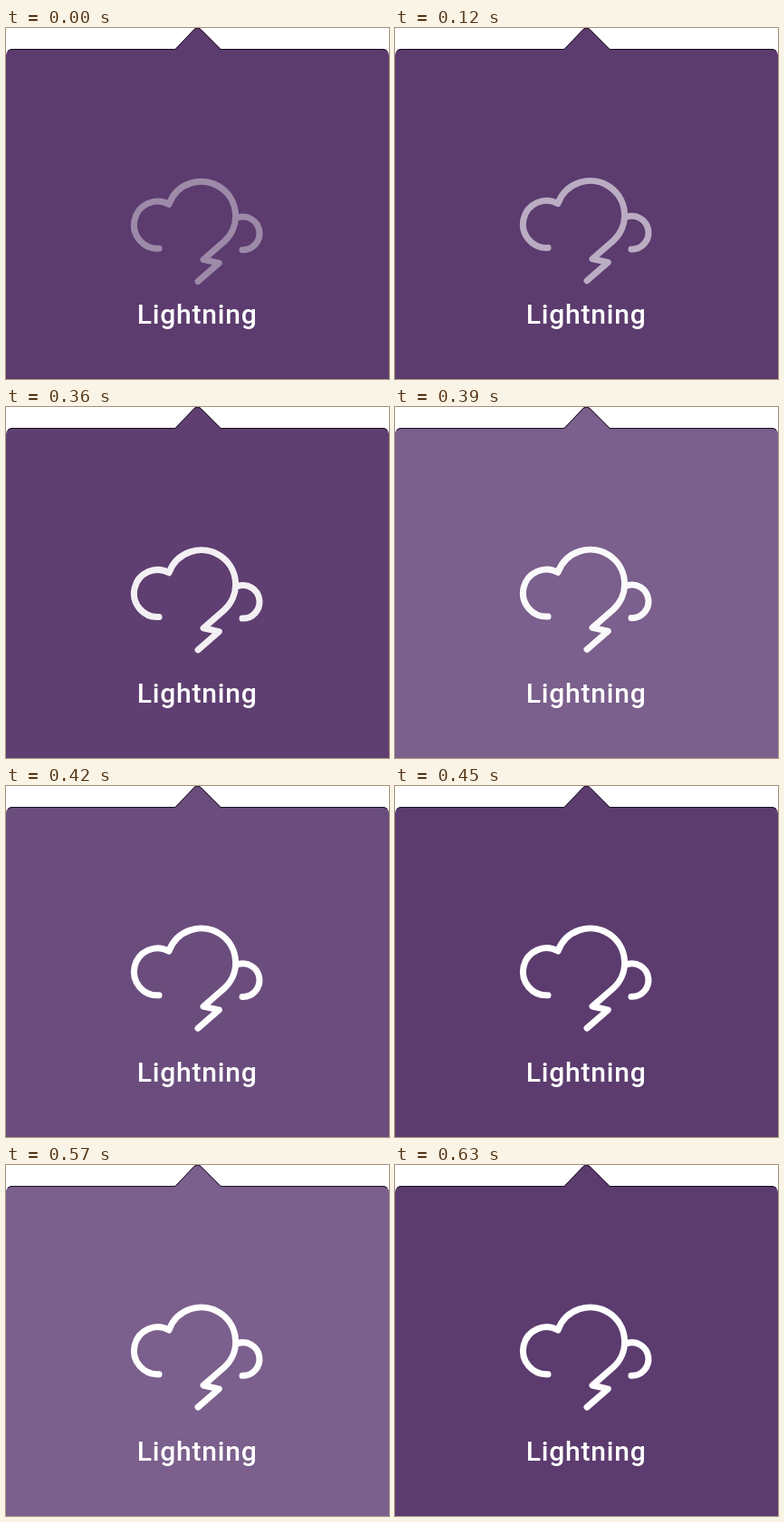
Write an HTML page that moves like this. It is 423 px wide and 387 px high and loops after 1.26 s.

```html
<!DOCTYPE html>
<html lang="en">
<head>
<meta charset="utf-8">
<title>Lightning</title>
<style>
  html, body { margin: 0; width: 100%; height: 100%; overflow: hidden; background: #fff; }
  svg { display: block; width: 100vw; height: 100vh; }
  .edge { fill: none; stroke: #1a1021; stroke-width: 1; }
  .icon { fill: none; stroke: #fff; stroke-width: 7; stroke-linecap: round; stroke-linejoin: round; }
  text { font: 500 30px Roboto, "Open Sans", sans-serif; letter-spacing: .8px; fill: #fff; }
</style>
</head>
<body>
<svg viewBox="0 0 423 387">
  <defs>
    <path id="panel" d="M0 387V30A7 7 0 0 1 7 23H187L208 1Q211.5 -2 215 1L237 23H416A7 7 0 0 1 423 30V387Z"/>
  </defs>
  <use href="#panel" fill="#5c3c6f"/>
  <use id="flash" href="#panel" fill="#7b5f8c" opacity="0"/>
  <path class="edge" d="M2 25.5Q4 23.5 7 23.5H187L208 1.5Q211.5 -1.5 215 1.5L237 23.5H416Q419 23.5 421 25.5"/>
  <g id="icon" class="icon">
    <path d="M169 230.7A26 26 0 1 1 180 182A37.9 37.9 0 1 1 241 223L218 243L235.3 246.8L212 267"/>
    <path d="M256 196.6A18.3 18.3 0 1 1 261 232.3"/>
  </g>
  <text x="144.7" y="325.6">Lightning</text>
</svg>
<script>
  const LOOP = 1260, STEP = 30, RISE = 480, FADE = 410;
  const icon = document.getElementById('icon');
  const flash = document.getElementById('flash');

  const easeInOut = x => x < 0.5 ? 4 * x ** 3 : 1 - 4 * (1 - x) ** 3;

  // brightness of one strike: faint onset, peak, fade
  function strike(t, peak) {
    const d = t - peak;
    if (d < -30 || d >= 60) return 0;
    return d < 0 ? 0.07 : 1 - d / 60;
  }

  function draw(now) {
    const t = Math.floor((now % LOOP) / STEP) * STEP;
    const lift = easeInOut(Math.min(t / RISE, 1));
    icon.setAttribute('transform', `translate(0 ${12.4 * (1 - lift)})`);
    icon.setAttribute('opacity', 0.4 + 0.6 * Math.min(t / FADE, 1));
    flash.setAttribute('opacity', strike(t, 390) + strike(t, 570));
  }

  const start = performance.now();
  function tick() {
    draw(performance.now() - start);
    requestAnimationFrame(tick);
  }
  tick();
</script>
</body>
</html>
```
